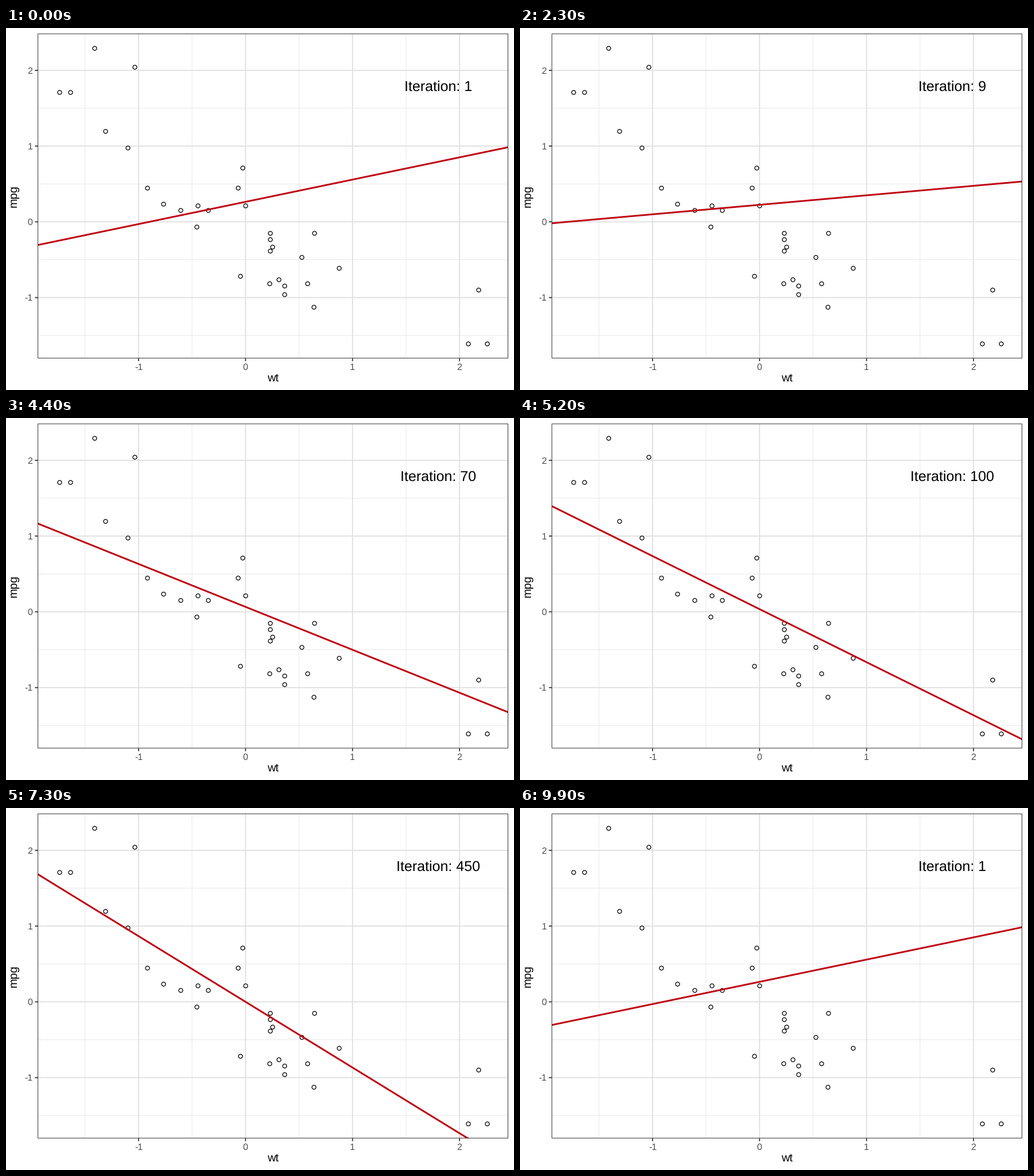
These frames come from a looping animation (885 by 632 pixels, 10 s). A matplotlib script:

```python
import numpy as np
import matplotlib.pyplot as plt
from matplotlib.animation import FuncAnimation
from matplotlib.patches import Rectangle

plt.rcParams.update({
    "font.family": "Liberation Sans",
    "text.hinting": "none",
    "text.hinting_factor": 1,
    "toolbar": "None",
})

W, H, DPI = 885, 632, 72          # at 72 dpi one point is one pixel
LEFT, RIGHT, TOP, BOTTOM = 55.3, 874.9, 9.6, 576.8
GREY20, GREY30 = "#333333", "#4d4d4d"
MAJOR, MINOR = "#dfdfdf", "#e7e7e7"
RED = "#bf0414"

MPG = np.array([
    21, 21, 22.8, 21.4, 18.7, 18.1, 14.3, 24.4, 22.8, 19.2, 17.8,
    16.4, 17.3, 15.2, 10.4, 10.4, 14.7, 32.4, 30.4, 33.9, 21.5, 15.5,
    15.2, 13.3, 19.2, 27.3, 26, 30.4, 15.8, 19.7, 15, 21.4])
WT = np.array([
    2.62, 2.875, 2.32, 3.215, 3.44, 3.46, 3.57, 3.19, 3.15, 3.44, 3.44,
    4.07, 3.73, 3.78, 5.25, 5.424, 5.345, 2.2, 1.615, 1.835, 2.465, 3.52,
    3.435, 3.84, 3.845, 1.935, 2.14, 1.513, 3.17, 2.77, 3.57, 2.78])


def scaled(v):
    return (v - v.mean()) / v.std(ddof=1)


def px(x):
    return 417.3 + 186.4 * x


def py(y):
    return 338.4 - 132.25 * y


wt, mpg = scaled(WT), scaled(MPG)

# Gradient descent in closed form: both coefficients decay geometrically.
RATE = 0.02
BEST = (wt @ mpg) / (wt @ wt)
START_SLOPE, START_ICEPT = 0.2936, 0.264


def coefs(iteration):
    n = iteration - 1
    icept = START_ICEPT * (1 - RATE) ** n
    slope = BEST + (START_SLOPE - BEST) * (1 - RATE * np.mean(wt ** 2)) ** n
    return icept, slope


# Logged iterations, each held for two or three ticks.
STEPS = [*range(1, 11), *range(20, 101, 10), *range(150, 1001, 50)]
HOLDS = [3 if k <= 27 and k != 17 else 2 for k in range(2, len(STEPS) + 1)]
STARTS = np.cumsum([2] + HOLDS)


def iteration_at(i):
    k = np.searchsorted(STARTS, i, side="right")
    return STEPS[k % len(STEPS)]


fig = plt.figure(figsize=((W + 1e-6) / DPI, (H + 1e-6) / DPI), dpi=DPI,
                 facecolor="white")
ax = fig.add_axes([0, 0, 1, 1])
ax.set_xlim(0, W)
ax.set_ylim(H, 0)
ax.axis("off")


def rule(xs, ys, color, width, z=1):
    return ax.plot(xs, ys, color=color, lw=width, zorder=z, snap=False,
                   solid_capstyle="butt")[0]


def label(x, y, s, size, color="black", ha="center", **kw):
    return ax.text(x, y, s, fontsize=size, color=color, ha=ha,
                   va="baseline", zorder=6, **kw)


for v in (-1.5, -0.5, 0.5, 1.5):
    rule([px(v)] * 2, [TOP, BOTTOM], MINOR, 0.95)
    rule([LEFT, RIGHT], [py(v)] * 2, MINOR, 0.95)

for v in (-1, 0, 1, 2):
    x, y = px(v), py(v)
    rule([x, x], [TOP, BOTTOM], MAJOR, 1.8, 2)
    rule([LEFT, RIGHT], [y, y], MAJOR, 1.8, 2)
    rule([x, x], [BOTTOM, BOTTOM + 4.9], GREY20, 1.8, 2)
    rule([LEFT - 4.9, LEFT], [y, y], GREY20, 1.8, 2)
    label(x, 597.2, str(v), 15.7, GREY30)
    label(46.5, y + 5.6, str(v), 15.7, GREY30, ha="right")

ax.plot(px(wt), py(mpg), "o", ms=7, mfc="none", mec="black", mew=1.27,
        zorder=3, snap=False)

panel = Rectangle((LEFT, TOP), RIGHT - LEFT, BOTTOM - TOP,
                  transform=ax.transData)
fit = rule([], [], RED, 3, 4)
fit.set_clip_path(panel)

ax.add_patch(Rectangle((55.6, 10.2), 818.9, 566.1, fill=False, ec=GREY20,
                       lw=1, zorder=5, snap=False))

label(px(0.256), 618.3, "wt", 19.64)
label(18.5, 293.2, "mpg", 19.64, ha="right", rotation=90).set(
    ha="right", va="center", x=22.6)
counter = label(px(1.8), 110, "", 25.4)

ENDS = np.array([-2.2, 2.7])


def update(i):
    it = iteration_at(i)
    icept, slope = coefs(it)
    fit.set_data(px(ENDS), py(icept + slope * ENDS))
    counter.set_text(f"Iteration: {it}")
    return fit, counter


anim = FuncAnimation(fig, update, frames=100, interval=100, repeat=True,
                     repeat_delay=0, blit=False)
plt.show()
```
